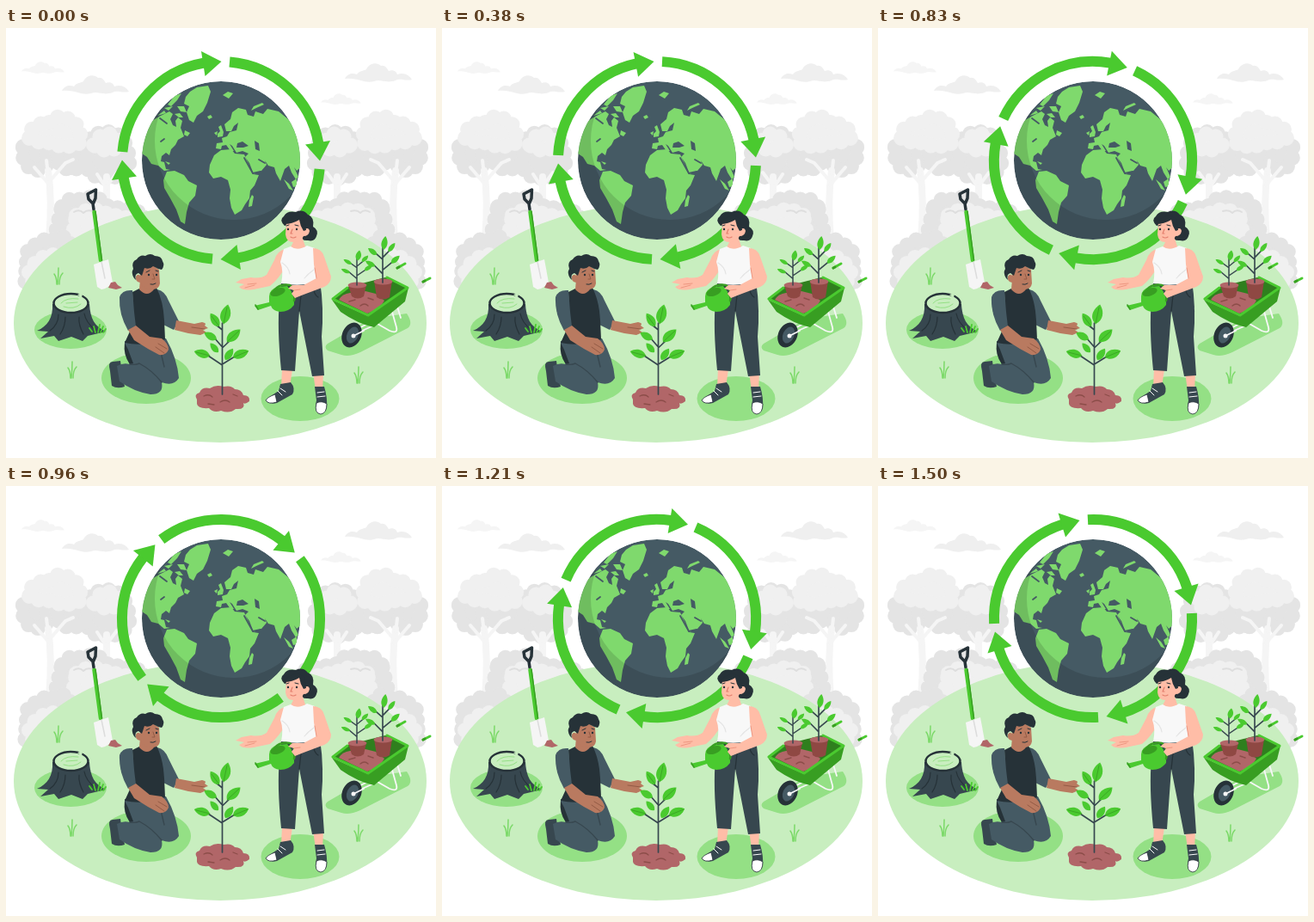
An HTML page without scripts for the animation above (1.54 s loop, 500 by 500 pixels).

```html
<!DOCTYPE html>
<html lang="en">
<head>
<meta charset="utf-8">
<title>Planting trees</title>
<style>
html, body { margin: 0; width: 100%; height: 100%; overflow: hidden; background: #fff; }
svg { display: block; width: 100%; height: 100%; }
.line { fill: none; stroke-linecap: round; stroke-linejoin: round; }
/* Zero-length dashes with round caps give scalloped edges */
.fluff { stroke-width: 18; stroke-linecap: round; stroke-dasharray: 0 12; }
.pale { fill: #f0f0f0; stroke: #f0f0f0; }
.grey { fill: #e4e4e4; stroke: #e4e4e4; }
.green { fill: #4aca2f; }
.moss { fill: #94e085; }
.land { fill: #7fd96d; }
.navy { fill: #263238; }
.slate { fill: #37474f; }
.denim { fill: #455a64; }
.tan { fill: #b97a60; }
.peach { fill: #ffbda7; }
.soil { fill: #b16668; }
</style>
</head>
<body>
<svg viewBox="0 0 500 500" xmlns="http://www.w3.org/2000/svg">
<defs>
  <clipPath id="globe"><circle cx="250" cy="154" r="92"/></clipPath>
  <path id="cloud" d="M0 18C3 12 9 11 14 13C17 8 23 9 25 7C28 0 37-2 42 3C47 2 49 6 51 9C55 7 60 9 61 13C69 10 75 14 78 19C70 21 65 17 59 20C48 24 42 18 34 21C22 24 16 16 0 18Z"/>
  <path id="leaf" d="M0 0C-9-5-7-16 0-23C7-16 8-6 0 0Z"/>
  <path id="tuft" class="line" stroke="#7bd968" stroke-width="1.5" d="M-1 9Q0-2 0-10M-2 9Q-2 1-5-3M1 9Q1 0 5-4"/>
  <g id="arrow" fill="#4aca2f">
    <path class="line" stroke="#4aca2f" stroke-width="12" style="stroke-linecap:butt" d="M135.4 144A115 115 0 0 1 230 40.7"/>
    <path d="M227 27L250.500 39L231.500 56Z"/>
  </g>
  <g id="grove">
    <g class="grey">
      <path class="fluff" d="M92 140Q98 121 118 121Q136 121 141 142Q148 162 134 170Q115 180 96 168Z"/>
      <path class="fluff" d="M20 138Q30 126 48 130L48 158Q40 168 30 164Q17 156 20 138Z"/>
      <path class="fluff" d="M58 138L86 130Q98 142 94 156Q80 170 62 160Z"/>
    </g>
    <path class="pale fluff" d="M50 110Q60 100 70 105Q83 108 84 120Q92 130 82 136Q65 140 47 132Q24 134 26 122Q36 110 50 110Z"/>
    <path class="pale fluff" d="M102 136Q111 120 122 124Q134 130 129 139Q116 146 102 136Z"/>
    <path class="line" stroke="#f5f5f5" stroke-width="8" d="M50 245Q54 200 49 166M117 225V173"/>
    <path class="line" stroke="#f5f5f5" stroke-width="4" d="M51 183L33 162M51 178L69 157L78 153M49 170L47 154M117 187L106 170M117 184L129 168"/>
    <path class="grey fluff" d="M65 208Q73 195 87 200Q106 192 118 207L160 215V255L55 250Z"/>
    <path class="pale fluff" d="M82 218Q99 206 117 216L150 223V260L75 255Z"/>
    <path class="grey fluff" d="M24 272Q22 256 35 252Q44 243 54 248Q67 237 75 250L66 280L22 300Z"/>
    <path class="pale fluff" d="M27 284Q36 264 58 264L75 270L35 304Z"/>
    <path class="line" stroke="#dedede" stroke-width="2" d="M79 214Q85 210 90 215Q94 211 101 213"/>
  </g>
  <g id="sprout">
    <path class="line" stroke="#37474f" stroke-width="1.500" d="M0 0V-38M0-9L-10-19M0-13L11-22M0-24L-8-31M0-26L8-34"/>
    <g class="green">
      <use href="#leaf" transform="translate(1 -34) rotate(8) scale(.55 .62)"/>
      <use href="#leaf" transform="translate(-8 -17) rotate(-62) scale(.42 .5)"/>
      <use href="#leaf" transform="translate(9 -20) rotate(48) scale(.45 .52)"/>
      <use href="#leaf" transform="translate(-6 -29) rotate(-55) scale(.42 .5)"/>
      <use href="#leaf" transform="translate(6 -32) rotate(38) scale(.42 .5)"/>
    </g>
  </g>
</defs>

<g fill="#efefef">
  <use href="#cloud" transform="translate(65 55)"/>
  <use href="#cloud" transform="translate(394 41)"/>
</g>
<g fill="#f5f5f5">
  <use href="#cloud" transform="translate(18 39) scale(.64)"/>
  <use href="#cloud" transform="translate(366 76) scale(.6)"/>
</g>
<use href="#grove"/>
<use href="#grove" transform="matrix(-1 0 0 1 502 0)"/>
<ellipse cx="249" cy="343" rx="240" ry="139" fill="#c8eebf"/>

<g id="earth" clip-path="url(#globe)">
  <circle class="denim" cx="250" cy="154" r="92"/>
  <g class="land">
    <path d="M209 80L214 74L222 69L235 67L238 74L234 87L229 97L222 102L218 110L213 107L210 98L213 91L207 88Z"/>
    <path d="M180 102L190 97L194 100L191 106L194 113L198 115L197 108L200 104L205 108L203 116L207 126L200 130L197 136L192 141L190 148L186 145L181 149L180 155L184 156L186 164L191 165L184 166L177 160L169 158L164 150L155 144L158 116L173 106Z"/>
    <path d="M188 89L196 79L204 76L199 84L192 91ZM199 91L207 91L210 98L203 97ZM184 93L194 91L189 96ZM176 102L184 96L186 99ZM196 100L202 99L206 104L201 104ZM208 119L214 122L211 126L207 124ZM185 155L191 157L189 159Z"/>
    <path d="M187 167L196 166L207 171L212 178L222 183L220 195L213 203L210 214L208 228L203 225L198 211L191 198L184 186L183 177Z"/>
    <path d="M234 103L238 101L240 104L236 106ZM246 123L249 120L247 115L250 113L253 121L252 126L246 127ZM252 78L258 74L264 76L259 82ZM285 96L288 91L298 87L300 89L291 93ZM242 122L246 120L245 125Z"/>
    <path d="M256 120L254 112L261 106L263 98L270 93L279 95L281 101L288 103L290 97L299 100L304 94L317 97L345 120V160L338 166L335 162L340 173L337 176L332 168L329 160L324 164L319 178L314 169L312 162L305 160L301 154L303 159L297 166L288 170L283 157L278 150L282 146L275 143L268 145L263 137L260 135L265 143L261 143L256 136L251 137L250 141L244 140L245 134L252 133L251 128L257 126L260 121L268 119L270 110L265 114L262 120Z"/>
    <path d="M242 148L250 142L262 141L266 146L277 147L282 158L287 170L294 171L289 183L284 189L283 198L278 205L274 212L266 217L262 209L260 198L261 188L258 177L250 173L241 175L236 168L237 159Z"/>
    <path d="M286 194L288 196L286 207L282 208L283 200ZM323 176L329 181L334 189L329 187ZM332 179L338 175L338 184L334 185Z"/>
  </g>
  <g class="denim">
    <path d="M269 134L275 132L282 137L276 139L268 139ZM289 131L294 134L295 143L290 141Z"/>
    <path class="line" stroke="#455a64" stroke-width="1.800" d="M277 151L287 169L296 167M294 153L301 157M179 105L187 111M180 132L184 129"/>
  </g>
  <path fill="#000" fill-opacity=".13" fill-rule="evenodd" d="M150 54H370V254H150ZM173 131a92 92 0 1 0 184 0a92 92 0 1 0-184 0Z"/>
</g>

<g id="ring">
  <animateTransform attributeName="transform" type="rotate" calcMode="discrete" begin="-0.004s" dur="1.54s" repeatCount="indefinite"
    values="0 250 154;8 250 154;20 250 154;28 250 154;40 250 154;48 250 154;60 250 154;68 250 154;80 250 154;88 250 154;10 250 154;18 250 154;30 250 154;38 250 154;50 250 154;58 250 154;70 250 154;78 250 154;0 250 154;8 250 154;20 250 154;28 250 154;40 250 154;48 250 154;60 250 154;68 250 154;80 250 154;88 250 154;10 250 154;18 250 154;30 250 154;38 250 154;50 250 154;58 250 154;70 250 154;78 250 154;82 250 154"/>
  <use href="#arrow"/>
  <use href="#arrow" transform="rotate(90 250 154)"/>
  <use href="#arrow" transform="rotate(180 250 154)"/>
  <use href="#arrow" transform="rotate(270 250 154)"/>
</g>

<g class="moss">
  <ellipse cx="75" cy="351" rx="42" ry="22"/>
  <ellipse cx="163" cy="407" rx="52" ry="30"/>
  <ellipse cx="342" cy="431" rx="45.500" ry="26"/>
  <path d="M374 367L424 338L466 332Q474 344 467 349L412 377Q399 383 390 380L374 375Q369 371 374 367Z"/>
</g>
<use href="#tuft" x="61" y="289"/>
<use href="#tuft" x="77" y="399" transform="translate(0 -1)"/>
<use href="#tuft" x="410" y="404"/>

<g id="shovel">
  <path class="line" stroke="#263238" stroke-width="3.500" d="M102 211L101 204L96 199L95 193L104.500 188L104 198L101.500 204"/>
  <path class="line" stroke="#4aca2f" stroke-width="4.500" d="M102.500 214L110 270"/>
  <path class="line" stroke="#389e22" stroke-width="1.500" d="M104 213L111.500 270"/>
  <path fill="#f5f5f5" d="M102 275L119 269L124 296Q118 303 111 304L106 301Z"/>
  <path class="line" stroke="#dcdcdc" stroke-width="1.500" d="M111 272L115 291"/>
  <path class="soil" d="M119 302L122 296L127 295L130 299L135 302L128 304Z"/>
</g>

<g id="stump">
  <path class="slate" d="M54 321C55 337 48 347 36 352L49 353L40 361L56 358L61 364L76 359L89 364L95 358L116 353C103 347 98 338 97 321Z"/>
  <path class="line" stroke="#263238" stroke-width="1.200" d="M61 333Q61 345 51 352M69 336Q69 347 63 356M85 336Q84 345 90 356M91 332Q93 343 104 351"/>
  <ellipse cx="75.500" cy="320" rx="20" ry="11" fill="#c8eebf" stroke="#263238" stroke-width="2.500"/>
  <path class="line" stroke="#94e085" stroke-width="1" d="M64 320Q70 313 84 315M67 324Q79 328 87 321M70 320L83 319"/>
  <path d="M83 310L89 308L88 314Z" fill="#c8eebf"/>
  <path class="line" stroke="#4aca2f" stroke-width="1.800" d="M100 353L97 349M104 354L102 347M107 354L109 345M110 354L113 347M113 354L116 350"/>
</g>

<g id="man">
  <path class="slate" d="M124 388Q118 388 121 399L123 416Q129 420 138 417L135 402L133 387Z"/>
  <path class="denim" d="M138 364L186 361Q199 384 201 407Q195 417 181 412Q184 426 168 426Q149 423 132 411L129 393Q136 389 144 391Q137 379 138 364Z"/>
  <path class="navy" d="M138 366Q136 380 144 391L148 390L142 374Z"/>
  <path class="line" stroke="#37474f" stroke-width="1.400" d="M155 390Q170 398 181 412M144 391Q151 392 155 390M180 377L184 394"/>
  <path class="denim" d="M176 304Q185 306 189 317L201 341L195 351L181 344L174 320Z"/>
  <path class="tan" d="M198 340L219 344L228 342Q234 343 231 346L235 349L229 351L233 354L226 357L212 355L196 351Z"/>
  <path class="navy" d="M147 307L155 303L175 302Q183 318 184 340L185 362Q160 371 138 366L148 344Z"/>
  <path class="tan" d="M156 292L174 297L172 304Q164 314 155 304Z"/>
  <path class="tan" d="M155 282Q158 274 169 275L178 281L179 297Q178 304 170 304Q160 304 156 296Q150 295 151 289Q153 285 156 288Z"/>
  <path class="navy" d="M149 291Q145 285 148 280Q145 272 152 269Q156 263 162 265Q168 261 173 265Q181 265 182 271Q185 276 181 281Q176 280 171 277Q167 281 161 279L158 288L154 285Q149 286 151 293Z"/>
  <path class="line" stroke="#263238" stroke-width="1" d="M163 284L167 282M174 282L177 283M168 298Q171 299 174 297"/>
  <g class="navy"><circle cx="166" cy="287" r="1.200"/><circle cx="175" cy="287" r="1.200"/></g>
  <path class="line" stroke="#935b45" d="M171 286L173 292L170 292"/>
  <path class="denim" d="M147 305Q135 304 132 313Q131 333 142 352L151 347L149 330Z"/>
  <path class="tan" d="M142 351L151 346L167 359L181 361Q189 367 189 374Q186 381 178 380L165 373L149 363Z"/>
  <path class="line" stroke="#935b45" d="M177 367L187 373M174 371L184 378M216 348L231 350"/>
</g>

<g id="sapling">
  <path class="soil" d="M222 432Q218 426 225 424Q228 417 237 419Q244 414 253 417Q262 415 266 420Q274 420 276 427Q284 427 283 434Q278 438 276 436Q279 444 267 443Q260 449 250 445Q241 448 236 442Q223 443 222 437Z"/>
  <path class="line" stroke="#8c4d49" stroke-width="1.300" d="M230 428Q236 425 240 429M249 435Q255 431 260 435M264 426L269 428M235 437L242 438"/>
  <path class="line" stroke="#37474f" stroke-width="1.700" d="M251.500 426V343M251.500 392L235 381M251.500 391L266 382M251.500 371L242 360M251.500 372L262 362M251.500 351L244 345"/>
  <g class="green">
    <use href="#leaf" transform="translate(253 344) rotate(13)"/>
    <use href="#leaf" transform="translate(248 347) rotate(-34) scale(.8)"/>
    <use href="#leaf" transform="translate(245 362) rotate(-62) scale(.72)"/>
    <use href="#leaf" transform="translate(257 365) rotate(47) scale(.92)"/>
    <use href="#leaf" transform="translate(247 377) rotate(-42) scale(.62)"/>
    <use href="#leaf" transform="translate(237 381) rotate(-75) scale(.82)"/>
    <use href="#leaf" transform="translate(255 386) rotate(34) scale(.7)"/>
    <use href="#leaf" transform="translate(264 383) rotate(67) scale(.86)"/>
  </g>
  <path class="line" stroke="#389e22" stroke-width=".8" d="M253 344L257 325M248 347L239 335M257 365L271 352M237 381L221 377M264 383L281 376"/>
</g>

<g id="barrow">
  <path class="line" stroke="#f7f7f7" stroke-width="1.800" d="M404 357L414 352L432 344L446 352Q456 356 454 348L449 330M455 324L459 337M405 352L420 344"/>
  <path class="line" stroke="#4aca2f" stroke-width="3" d="M455 279L464 274M485 295L493 291"/>
  <path class="line" stroke="#389e22" stroke-width="3" d="M455 279L457 278M485 295L487 294"/>
  <path fill="#2f7f1e" d="M380 315L398 301L441 290L467 302L421 333Z"/>
  <path class="soil" d="M387 316Q391 309 400 308L418 306L430 309L440 317L434 326L420 332Z"/>
  <path class="line" stroke="#8c4d49" stroke-width="1.400" d="M399 318L406 316M412 323Q417 319 421 323M421 314L427 316"/>
  <path fill="#389e22" d="M379 316L389 330Q409 344 428 348L464 318L468 302L421 335Z"/>
  <path class="line" stroke="#4aca2f" stroke-width="3" d="M397 302L380 315L421 334L467 302L443 290"/>
  <path fill="#8f4843" d="M398 299H419L416 312Q409 317 402 312ZM428 294H449L446 313Q438 318 431 313Z"/>
  <g class="soil"><ellipse cx="408.500" cy="299" rx="11" ry="3.500"/><ellipse cx="438.500" cy="295" rx="11" ry="3.500"/></g>
  <use href="#sprout" transform="translate(408 299) scale(1 .84)"/>
  <use href="#sprout" transform="translate(438 296) scale(1.100 1.120)"/>
  <ellipse class="navy" cx="402" cy="357" rx="11" ry="15" transform="rotate(24 402 357)"/>
  <ellipse class="denim" cx="403" cy="357" rx="6.500" ry="10" transform="rotate(24 403 357)"/>
  <path class="line" stroke="#f7f7f7" stroke-width="1.800" d="M404 358L416 352"/>
  <circle cx="404" cy="358" r="2.500" fill="#f7f7f7"/>
</g>

<g id="woman">
  <path class="peach" d="M321 396L333 397L330 417L320 418ZM357 400L369 401L368 422H360Z"/>
  <path class="slate" d="M319 414L331 412Q337 419 333 426L315 436Q305 438 302 433Q310 426 317 422ZM359 417H370Q374 430 373 442Q370 449 363 448Q358 444 361 433Z"/>
  <path fill="#fff" stroke="#263238" stroke-width=".8" d="M313 426Q304 429 302 433Q305 438 315 435ZM361 436Q358 448 366 449Q373 448 373 437Q367 433 361 436Z"/>
  <path class="line" stroke="#fff" stroke-width="1" d="M319 419L325 423M316 422L321 427M362 424L370 423M362 429L371 428"/>
  <path class="slate" d="M320 297L365 294Q370 326 367 359L370 404L356 405L341 329L336 399L320 398Q315 348 318 318Z"/>
  <path class="line" stroke="#263238" stroke-width="1.300" d="M341 329L343 311M357 301Q358 310 363 313M320 302L365 299"/>
  <path class="navy" d="M324 230Q317 223 323 219Q327 212 337 214Q345 210 351 217Q359 220 357 231Q364 235 361 242Q359 249 351 247Q343 248 342 240L335 226Z"/>
  <path class="peach" d="M343 239L348 254L361 257L359 274L324 270L331 255L335 247Z"/>
  <path class="peach" d="M326 226Q337 226 341 220L347 234Q352 231 353 236Q352 242 346 242Q342 250 334 249Q326 249 325 240Z"/>
  <path class="navy" d="M323 228Q329 219 339 218L347 222L349 235L346 236Q342 230 341 223Q333 228 323 228Z"/>
  <path class="line" stroke="#263238" stroke-width="1" d="M326 230L329 229M336 229L340 230"/>
  <g class="navy"><circle cx="328" cy="234" r="1.200"/><circle cx="338" cy="234" r="1.200"/></g>
  <path class="line" stroke="#e37f6d" stroke-width="1.200" d="M333 234L331 239H333M331 243Q334 245 337 243"/>
  <path class="peach" d="M325 257Q315 259 312 270L303 287Q296 292 285 290L274 292L267 296L277 298L271 301Q275 306 288 304L307 300Q318 291 326 276Z"/>
  <path class="line" stroke="#ed9680" d="M281 298L291 297M278 302L289 299"/>
  <path fill="#f8f8f8" d="M323 257L331 254Q339 260 350 253L359 256L362 296Q341 301 320 297Q323 283 319 272Z"/>
  <path class="line" stroke="#e4e4e4" stroke-width="1.200" d="M321 273Q329 278 330 286M358 281Q351 286 347 291"/>
  <g id="can">
    <path class="green" d="M306 312Q306 304 316 301L327 300Q336 309 335 322Q329 330 319 330Q310 329 308 323L293 328L289 323L306 319Z"/>
    <ellipse cx="316" cy="307" rx="9" ry="4.500" transform="rotate(-18 316 307)" fill="#389e22"/>
    <path class="line" stroke="#389e22" stroke-width="2.500" d="M312 305Q318 297 330 299Q338 304 335 317"/>
    <path class="line" stroke="#389e22" stroke-width="1.500" d="M290 322L293 327"/>
  </g>
  <path class="peach" d="M357 256Q367 256 370 266L378 289Q378 297 370 301L346 310L336 314L332 309L335 305L328 303L333 299L346 299L361 291L358 275Z"/>
  <path class="line" stroke="#ed9680" d="M335 305L342 304M361 291L359 279"/>
</g>
</svg>
</body>
</html>
```
